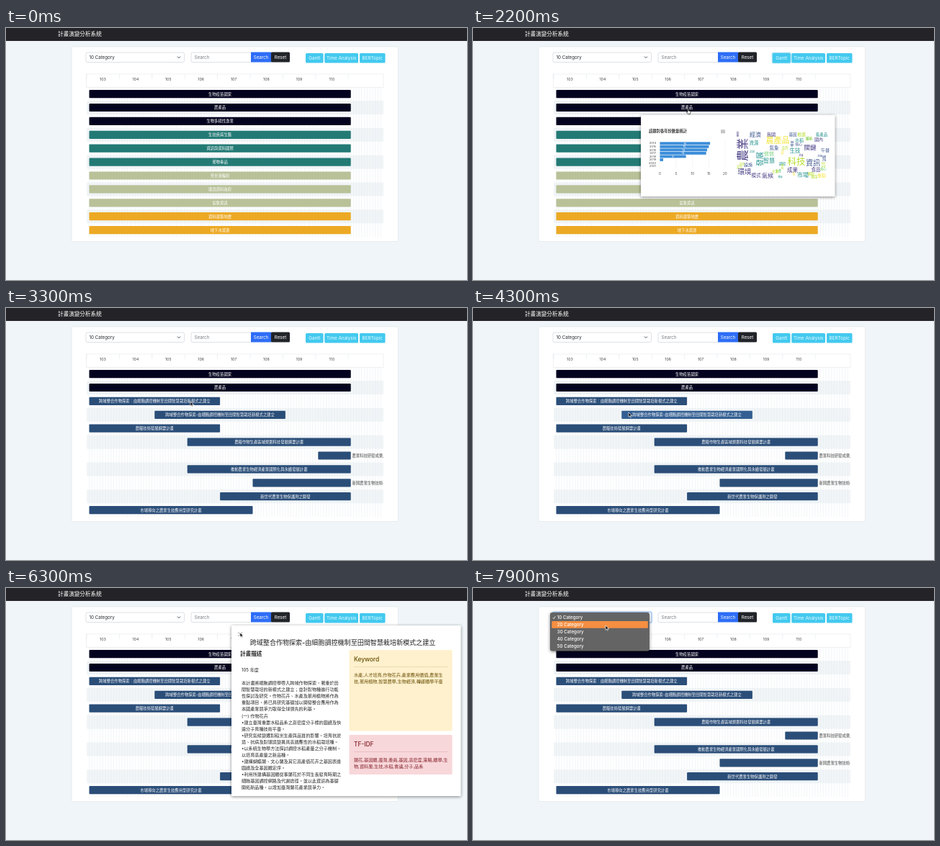
Animation of 640 by 350 pixels, one loop 8 s. Source, as an HTML page:

```html
<!DOCTYPE html>
<html>
<head>
<meta charset="utf-8">
<style>
html, body { margin: 0; width: 100%; height: 100%; overflow: hidden; background: #eff5f8; }
svg { display: block; width: 640px; height: 350px; }
text { font-family: Inter, "Noto Sans CJK TC", "Noto Sans CJK JP", "Noto Sans CJK", sans-serif; white-space: pre; }
.shade { filter: drop-shadow(0 1px 2px #0007); }
</style>
</head>
<body>
<svg id="stage" viewBox="0 0 640 350"></svg>
<script>
const rect = (x, y, w, h, fill, extra = '') =>
  `<rect x="${x}" y="${y}" width="${w}" height="${h}" fill="${fill}" ${extra}/>`;
const line = (x1, y1, x2, y2, color, width = .5) =>
  `<path d="M${x1} ${y1}L${x2} ${y2}" stroke="${color}" stroke-width="${width}" fill="none"/>`;
// y is the middle of the text line
const text = (x, y, s, size, fill, extra = '') =>
  `<text x="${x}" y="${y + size * .37}" font-size="${size}" fill="${fill}" ${extra}>${s}</text>`;
const group = (id, body, extra = '') => `<g id="${id}" ${extra}>${body}</g>`;
const mid = 'text-anchor="middle"';
const round = 'rx="1.5"';

const YEAR = 45.4, LEFT = 115.5, ROW = 18.9;
const rowY = i => 86 + i * ROW;

function page() {
  let s = rect(0, 0, 640, 350, '#eff5f8') + rect(0, 0, 640, 18, '#242428') +
    text(72, 8, '計畫演變分析系統', 7.6, '#fff') +
    rect(91, 26, 453.5, 270.5, '#fff', 'rx="1.5" stroke="#dfe5e9" stroke-width=".7"') +
    rect(111, 34, 136.5, 13.5, '#fff', 'rx="2" stroke="#cfd5db" stroke-width=".7"') +
    text(115.5, 40.7, '10 Category', 6.2, '#25292d') +
    '<path d="M238 39.6l2 2 2-2" fill="none" stroke="#343a40" stroke-width=".9"/>' +
    rect(257, 34, 84, 13.5, '#fff', 'rx="2" stroke="#cfd5db" stroke-width=".7"') +
    text(261.5, 40.7, 'Search', 6.3, '#777e85') +
    rect(340, 33.5, 28.5, 14, '#2d6df6') + text(354, 40.7, 'Search', 6.2, '#fff', mid) +
    rect(368, 33.5, 26, 14, '#212429', round) + text(381, 40.7, 'Reset', 6.2, '#fff', mid) +
    group('focus', rect(414.7, 33.7, 27, 15.6, '#a0def2', 'rx="2.5"'));
  for (const [x, w, label] of [[416, 24.5, 'Gantt'], [442.3, 46.7, 'Time Analysis'], [491, 35.5, 'BERTopic']])
    s += rect(x, 35, w, 13.5, '#43c9ef', round) + text(x + w / 2, 41.8, label, 6.3, '#e9fbff', mid);
  return s;
}

function grid() {
  let s = '';
  for (let i = 1; i < 11; i += 2) s += rect(112, rowY(i) - 3.8, 412, ROW, '#f1f5f7');
  for (let x = LEFT; x < 522; x += YEAR / 12) s += line(x, 83, x, 290, '#e5eaee');
  s += rect(111.5, 64, 412.5, 18.5, '#fff', 'stroke="#e3e7ea" stroke-width=".6"');
  for (let i = 0; i < 9; i++) {
    const x = 112 + i * YEAR;
    s += line(x, 64, x, 71, '#dde1e5');
    s += i < 9 - 1 ? text(134.5 + i * YEAR, 70.6, 103 + i, 5.3, '#444', mid) : '';
  }
  return s;
}

function bar(row, from, to, label, color, outside) {
  const x = LEFT + from * YEAR, w = (to - from) * YEAR, y = rowY(row);
  return rect(x, y, w, 11.2, color, `rx="1" ${row === 3 ? 'class="hot"' : ''}`) +
    (outside ? text(x + w + 1.7, y + 5.4, label, 5.35, '#444', 'clip-path="url(#chart)"')
             : text(x + w / 2, y + 5.6, label, 5.33, '#fff', mid));
}

const tones = ['#03031f', '#237a75', '#b8c198', '#eca924'];
const topics = ['生物疫苗國家', '農產品', '生物多樣性漁業', '生技疾病生醫', '資訊與資料國際', '藥物毒品',
  '奈米液輻射', '環境資料政府', '氣象資訊', '資料建築地震', '地下水資源'];
const topicBar = (label, i) => bar(i, 0, 8, label, tones[Math.floor(i / 3)]);

const area = '跨域整合作物探索', goal = '由細胞調控機制至田間智慧栽培新模式之建立';
const projects = [
  [0, 4, area + '：' + goal], [2, 6, area + '-' + goal], [0, 4, '農糧技術發展綱要計畫'],
  [3, 8, '農糧作物生產區域規劃科技發展綱要計畫'], [7, 8, '農業科技研發成果產業化', 1],
  [3, 8, '推動農業生物經濟產業國際化與永續發展計畫'], [5, 8, '新興農業生物技術-研發', 1],
  [4, 8, '新世代農業生物保護劑之開發'], [0, 5, '市場導向之農業生技應用型研究計畫']];
const projectBar = ([from, to, label, outside], i) => bar(i + 2, from, to, label, '#2b4e79', outside);

function wordCloud() {
  const colors = ['#443a83', '#3b528b', '#21918c', '#5ec962', '#b5de2b', '#f4e436'];
  // word, centre, size, colour, upright
  const words = [['農業', 374, 169, 16, 0, 1], ['農產品', 423, 156, 11, 5], ['科技', 449, 185, 12.5, 4],
    ['資訊', 472, 187, 10, 1], ['環境', 377, 199, 9.5, 0], ['經濟', 392, 148.5, 8, 1], ['我國', 414, 148, 6, 0],
    ['關鍵', 468, 166, 8.5, 0], ['成果', 443.5, 197, 7.5, 0], ['市場', 458, 204, 8, 2], ['食品', 476, 197, 6.5, 0],
    ['氣候', 409, 205, 8, 0], ['智慧', 411, 184, 8, 2], ['發展', 398, 182, 10, 2, 1], ['生技', 447, 170.5, 7.5, 2],
    ['水稻', 453, 156, 6, 2], ['國內', 480, 155, 6, 0], ['基因', 444, 148, 5.5, 1], ['午餐', 489, 170, 6, 1],
    ['模式', 393, 204.5, 6.5, 0], ['氣象', 418, 167, 6.5, 1], ['資源', 390, 160, 6.5, 2], ['信信', 411, 174, 7, 3],
    ['推廣', 456, 148, 6, 4], ['畜產品', 484, 148, 5.5, 2], ['設施', 382, 190, 6, 1], ['重點', 484, 205, 6, 5]];
  const small = ['機制', '品質', '核心', '生產', '調控', '試驗', '食農', '病毒', '溫室', '種苗'];
  let seed = 7, s = '';
  const rnd = () => (seed = seed * 16807 % 2147483647) / 2147483647;
  const put = (word, x, y, size, c, up) => s += text(x, y, word, size, colors[c],
    mid + (up ? ` transform="rotate(-90 ${x} ${y})"` : ''));
  for (let i = 0; i < 85; i++) {
    const x = 367 + rnd() * 124, y = 147 + rnd() * 60, size = 3 + rnd() * 2;
    const c = Math.floor(rnd() * 6), up = rnd() < .3;
    if (!words.some(w => Math.abs(x - w[1]) < (w[5] ? .6 : w[0].length / 2) * w[3] + size * .6 &&
        Math.abs(y - w[2]) < (w[5] ? 1 : .5) * w[3] + size * .3)) put(small[i % 10], x, y, size, c, up);
  }
  words.forEach(w => put(...w));
  return s;
}

function popup() {
  let s = rect(233, 121, 269.5, 113, '#fff', 'class="shade"') +
    text(244, 143, '該類別各年份數量統計', 5.3, '#333', 'font-weight="700"');
  for (const y of [142, 143.7, 145.4]) s += line(344, y, 350, y, '#777', .7);
  for (let v = 0; v <= 20; v += 5) {
    const x = 259.5 + v * 4.52;
    s += line(x, 157, x, 195, '#e8e8e8', .4) + text(x, 202, v, 4.6, '#444', mid);
  }
  [15.4, 15, 14.5, 14.2, 8, 1, 0, 0].forEach((v, i) => {
    const y = 160 + i * 4.55;
    s += text(254, y, 2014 + i, 4, '#444', 'text-anchor="end"') + rect(259.5, y - 1.7, v * 4.52, 3.9, '#3d8ed9');
    if (v > 1) s += text(259.5 + v * 2.26, y + .2, Math.floor(v), 4, '#fff', mid);
  });
  return s + wordCloud();
}

const story = `105 年度

本計畫將細胞調控學帶入跨域作物探索，著重於田
間智慧栽培的新模式之建立；並針對物種進行功能
性探討及研究。作物花卉、水產及藥用植物將作為
重點項目，將已具研究基礎加以開發整合應用作為
本國產業競爭力取得全球領先的利基。
(一) 作物花卉
•建立臺灣重要水稻品系之高密度分子標的圖譜及快
速分子育種技術平臺。
•研究氣候變遷對稻米生產與品質的影響。培育抗逆
境、抗病及對環境變異具高適應性的水稻栽培種。
•以系統生物學方法探討調控水稻產量之分子機制，
以培育高產量之新品種。
•建構蝴蝶蘭、文心蘭及其它高產值花卉之基因表達
圖譜及全基因體定序。
•利用所建構基因體從事蘭花於不同生長發育時期之
細胞基因調控網路及代謝途徑。並以此資訊為基礎
開拓新品種，以增加臺灣蘭花產業競爭力。`.split('\n');

function note(y, h, title, lines, fill, ink) {
  return rect(476.5, y, 143, h, fill, 'rx="1.5"') + text(483, y + 12.5, title, 8.4, ink, 'font-weight="500"') +
    line(483, y + 23.5, 613, y + 23.5, ink + '44') +
    lines.map((l, i) => text(483, y + 34.8 + i * 9.1, l, 6.13, ink)).join('');
}

const drawer = () => rect(313, 52, 318.5, 237, '#fff', 'class="shade" rx="1"') +
  line(322.5, 61.5, 328, 67, '#666', .8) + line(328, 61.5, 322.5, 67, '#666', .8) +
  text(467.5, 76, area + '-' + goal, 9.05, '#222', mid + ' font-weight="500"') +
  text(325, 91, '計畫描述', 7.6, '#222', 'font-weight="700"') +
  story.map((l, i) => text(327, 113.7 + i * 9.08, l, 6.13, '#222')).join('') +
  note(86, 112.5, 'Keyword', ['水產,人才培育,作物花卉,產業應用價值,農業生', '技,藥用植物,智慧農學,生物經濟,轉譯體學平臺'],
    '#fff1cd', '#664d03') +
  note(204, 55, 'TF-IDF', ['蘭花,基因體,臺灣,委員,基因,高密度,策略,體學,生', '物,資料庫,生技,水稻,會議,分子,品系'],
    '#f8d7da', '#842029');

function menu() {
  let s = rect(110.3, 33.3, 137.9, 15, '#fff', 'rx="2.5" stroke="#a9cdf8" stroke-width="1.6"') +
    rect(107, 34, 138, 53.5, '#646464', 'rx="3" class="shade"') +
    rect(109.3, 0, 133.5, 9.8, '#f58f41', 'id="pick" rx="1.2"') +
    '<path d="M111 41.2l1.2 1.5 2.2-3.4" fill="none" stroke="#fff" stroke-width=".8"/>';
  for (let i = 0; i < 5; i++)
    s += text(116.8, 41.2 + i * 9.8, (i + 1) * 10 + ' Category', 6.2, '#fff', 'font-weight="500"');
  return s;
}

const outline = 'stroke="#fff" stroke-width=".7" stroke-linejoin="round"';
const cursors = {
  arrow: `<path d="M0-2v6.2l1.5-1.3 1 2.2 1-.5-1-2.1h2z" fill="#000" ${outline}/>`,
  move: `<path d="M0-3.5l1.6 2h-1v1.4h1.4v-1l2 1.6-2 1.6v-1h-1.4v1.4h1l-1.6 2-1.6-2h1v-1.4h-1.4v1l-2-1.6 2-1.6v1h1.4v-1.4h-1z" fill="#fff" stroke="#222" stroke-width=".5"/>`,
  hand: `<path d="M-1-3q.7-.6 1.2 0v2.4l2.6.6q.5.4.3 1.4l-.6 2.5h-3.2l-2-2.6q.2-.9 1.7 0z" fill="#fff" stroke="#111" stroke-width=".7"/>`,
  beam: `<path d="M-1-3l1 .6 1-.6M0-2.4v5M-1 3.2l1-.6 1 .6" fill="none" stroke="#222" stroke-width=".7"/>`
};

const stage = document.getElementById('stage');
stage.innerHTML = '<clipPath id="chart"><rect x="111" y="60" width="413" height="235"/></clipPath>' +
  page() + grid() + topics.slice(0, 2).map(topicBar).join('') +
  group('topics', topics.slice(2).map((l, i) => topicBar(l, i + 2)).join('')) +
  group('projects', projects.map(projectBar).join('')) +
  group('popup', popup()) + group('drawer', drawer()) + group('menu', menu()) +
  group('cursor', Object.entries(cursors).map(([id, s]) => group(id, s)).join(''));

const $ = id => document.getElementById(id);
const show = (id, on) => $(id).setAttribute('visibility', on ? 'inherit' : 'hidden');
const hot = document.querySelector('#projects .hot');

// time, x, y
const path = [[200, 470, 60], [500, 430, 43], [900, 430, 43], [1600, 299, 92.5], [1900, 299, 92.5], [2100, 299, 115.5],
  [2900, 299, 115.5], [3200, 256, 132], [3300, 256, 132], [3500, 240, 166], [3600, 240, 166], [3700, 240, 147],
  [3900, 240, 147], [4000, 246, 161], [4100, 216, 147], [4700, 216, 147], [5000, 345, 81], [5100, 345, 81],
  [5400, 325, 64], [6400, 325, 64], [6800, 190, 45], [7100, 190, 45], [7200, 184, 42], [7500, 184, 65],
  [7700, 184, 65], [7800, 184, 57], [7900, 184, 54], [8000, 184, 54]];

function cursorAt(t) {
  const i = path.findIndex(p => p[0] > t);
  const [a, b] = i > 0 ? [path[i - 1], path[i]] : [path[0], path[0]];
  const k = b === a ? 0 : (t - a[0]) / (b[0] - a[0]);
  const e = k * k * (3 - 2 * k);
  return [a[1] + (b[1] - a[1]) * e, a[2] + (b[2] - a[2]) * e];
}

function draw(now) {
  const t = Math.floor(now % 8000 / 100) * 100;
  const within = (from, to) => t >= from && t < to;
  const [x, y] = cursorAt(t);
  show('focus', within(500, 3000));
  show('topics', t < 3000);
  show('projects', t >= 3000);
  show('popup', within(2200, 3000));
  show('drawer', within(4700, 6500));
  show('menu', t >= 7200);
  $('pick').setAttribute('y', 36.2 + 9.8 * Math.max(0, Math.min(4, Math.floor((y - 36.2) / 9.8))));
  hot.setAttribute('fill', within(4300, 4700) ? '#345f92' : '#2b4e79');
  $('cursor').setAttribute('transform', `translate(${x} ${y})`);
  show('cursor', t >= 200);
  const kind = within(1500, 2000) ? 'move' : within(500, 900) || within(2000, 3100) ? 'hand'
    : within(5000, 5300) ? 'beam' : 'arrow';
  for (const id in cursors) show(id, id === kind);
  requestAnimationFrame(draw);
}
requestAnimationFrame(draw);
</script>
</body>
</html>
```
